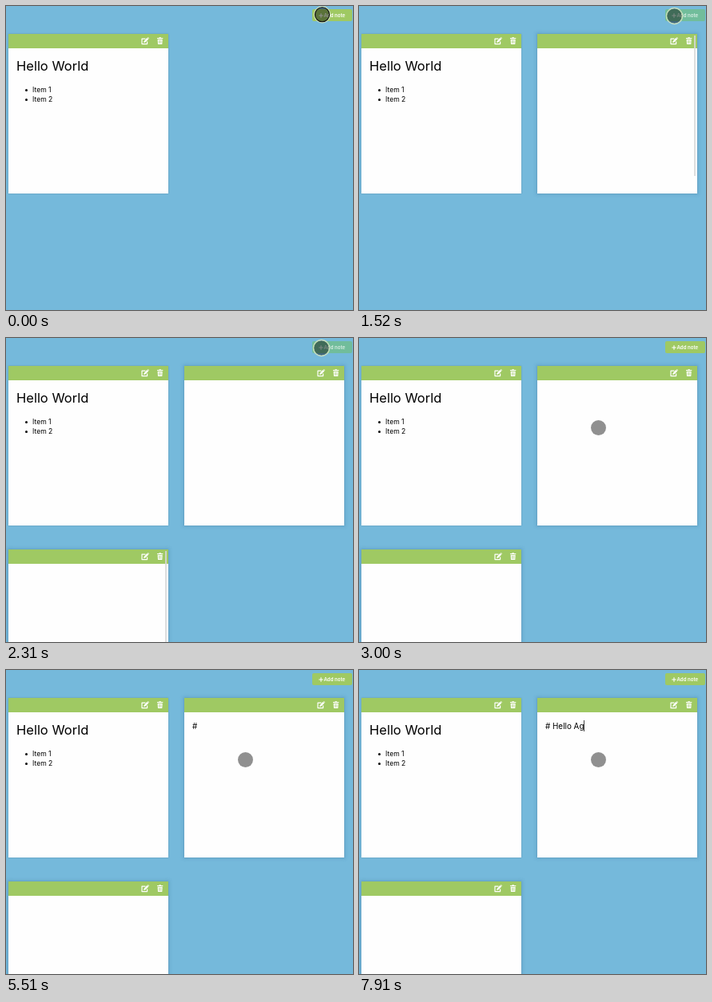
Write an HTML page that moves like this. It is 434x381 px and loops after 8000 ms.

```html
<!DOCTYPE html>
<html lang="en">
<head>
<meta charset="utf-8">
<title>Notes</title>
<style>
  html, body { margin: 0; width: 100%; height: 100%; overflow: hidden; background: #75b9db; }
  body { position: relative; font-family: Inter, sans-serif; color: #000; }
  .note {
    position: absolute; width: 200px; height: 200px; background: #fefefe;
    box-shadow: 0 0 2px rgba(0, 0, 0, .2);
  }
  .note.new { box-shadow: 0 0 2px rgba(0, 0, 0, .15), 0 0 4px 2px rgba(60, 120, 165, .2); }
  .head { height: 18px; background: #9fc963; }
  .head svg { position: absolute; left: 0; top: 0; }
  .bar { position: absolute; left: 196px; top: 2px; width: 2px; background: #d9d9d9; }
  .line { position: absolute; white-space: pre; line-height: 14px; }
  .title { left: 10px; top: 33px; font-size: 16.5px; }
  .item { left: 30px; font-size: 8.6px; }
  .item::before {
    content: ""; position: absolute; left: -9px; top: 5.5px;
    width: 3.4px; height: 3.4px; border-radius: 50%; background: #000;
  }
  #editor { left: 233px; top: 63px; font-size: 9.9px; display: flex; }
  #caret { width: 1px; height: 14px; background: #444; }
  #add {
    position: absolute; left: 382.5px; top: 4px; width: 50px; height: 15px;
    border-radius: 2px; background: #9fc963; color: #fff;
  }
  #add.active { background: #71bd9b; color: rgba(255, 255, 255, .75); }
  #add span { position: absolute; left: 15px; top: 0; font: 600 6.1px/15px Inter, sans-serif; white-space: pre; }
  #add svg { position: absolute; left: 8px; top: 4.5px; }
  #pointer { position: absolute; left: 0; top: 0; }
</style>
</head>
<body>
<div id="add">
  <svg width="6" height="6"><path d="M3 .3V5.7M.3 3H5.7" stroke="currentColor" stroke-width="1.1"/></svg>
  <span>Add note</span>
</div>
<div id="notes"></div>
<div id="editor" class="line"><span id="typed"></span><i id="caret"></i></div>
<svg id="pointer" width="434" height="381">
  <g id="spot">
    <circle r="9.5" fill="#000" fill-opacity=".43"/>
    <circle id="pale" r="10" fill="none" stroke="#d5e5bd" stroke-opacity=".85" stroke-width="1.4"/>
    <circle id="dark" r="9" fill="none" stroke="#111" stroke-width="1.1"/>
  </g>
  <path id="move" transform="translate(299 112)" stroke="#fff" stroke-width=".8" paint-order="stroke"
    d="M0-7.5L3.2-4H1V-1H4V-3.2L7.5 0L4 3.2V1H1V4H3.2L0 7.5L-3.2 4H-1V1H-4V3.2L-7.5 0L-4-3.2V-1H-1V-4H-3.2Z"/>
</svg>
<script>
const LOOP = 8000;
const HOLD = 170;         // from pressing the button to the new note
const FLASH = 90;         // how long the button stays lit afterwards
const FOCUS = 3180;
const presses = [-80, 1350, 2130];
const bursts = [
  { start: 5060, gap: 540, text: "# " },
  { start: 6050, gap: 140, text: "Hello " },
  { start: 7470, gap: 440, text: "Ag" }
];
const dragCursor = [[4340, 4790], [5780, 6050], [7110, 7470]];

const $ = id => document.getElementById(id);
const show = (el, on) => { el.style.visibility = on ? "visible" : "hidden"; };
const clamp = x => Math.min(1, Math.max(0, x));
const within = (t, start, end) => t >= start && t < end;
const mix = (a, b, k) => a + (b - a) * k;

const icons = `<svg width="200" height="18">
  <path d="M171.5 6.2H167V12.6H173.6V9.6" fill="none" stroke="#fff" stroke-width="1.2" stroke-linejoin="round"/>
  <path d="M169.2 11L169.6 8.9L173.6 4.8L175.3 6.5L171.3 10.6ZM174.1 4.4L174.7 3.9L176.2 5.4L175.7 6Z" fill="#fff"/>
  <path d="M186 5H188.2L188.7 4.3H190.6L191.1 5H193.3V6.1H186ZM186.6 6.7H192.7L192.3 13H187Z" fill="#fff"/>
  <path d="M188.3 7.8V11.9M189.65 7.8V11.9M191 7.8V11.9" stroke="#9fc963" stroke-width=".55"/>
</svg>`;

function addNote(x, y, content, kind = "") {
  const note = document.createElement("div");
  note.className = "note " + kind;
  note.style.cssText = `left:${x}px;top:${y}px`;
  note.innerHTML = `<div class="head">${icons}</div>${content}`;
  $("notes").append(note);
  return note;
}

addNote(3, 35, `<div class="line title">Hello World</div>
  <div class="line item" style="top:63px">Item 1</div>
  <div class="line item" style="top:75px">Item 2</div>`);

const created = [[223, 35], [3, 265]].map(([x, y], i) => ({
  note: addNote(x, y, `<div class="bar"></div>`, "new"),
  born: presses[i + 1] + HOLD
}));

function drawNote({ note, born }, t) {
  const age = t - born, bar = note.querySelector(".bar");
  show(note, age >= 0);
  // The scrollbar shrinks to the header strip, then fades.
  bar.style.height = (age < FLASH ? 176 : 16) + "px";
  bar.style.opacity = .85 * (1 - clamp((age - 220) / 220));
}

function drawPointer(t, lit) {
  const pressed = presses.some(p => within(t, p, p + HOLD));
  const travel = 1 - (1 - clamp((t - 2600) / 320)) ** 2;
  const x = mix(lit ? 394.5 : 395.5, 299.5, travel);
  const y = mix(lit ? 12.5 : 10.8, 112.5, travel);
  const dragging = dragCursor.some(([start, end]) => within(t, start, end));

  $("spot").setAttribute("transform", `translate(${x} ${y})`);
  $("spot").style.display = dragging ? "none" : "";
  show($("dark"), pressed);
  show($("pale"), pressed || lit);
  show($("move"), dragging);
}

function drawEditor(t) {
  let text = "", lastKey = FOCUS;
  for (const burst of bursts) {
    if (t < burst.start) break;
    const count = Math.min(burst.text.length, Math.floor((t - burst.start) / burst.gap) + 1);
    text += burst.text.slice(0, count);
    lastKey = burst.start + (count - 1) * burst.gap;
  }
  $("typed").textContent = text;
  show($("caret"), t >= FOCUS && (t - lastKey) % 980 < 450);
}

function draw(t) {
  const lit = created.some(({ born }) => within(t, born, born + FLASH));
  $("add").classList.toggle("active", lit);
  created.forEach(item => drawNote(item, t));
  drawPointer(t, lit);
  drawEditor(t);
}

const begin = performance.now();
function tick() {
  draw((performance.now() - begin) % LOOP);
  requestAnimationFrame(tick);
}
tick();
</script>
</body>
</html>
```
